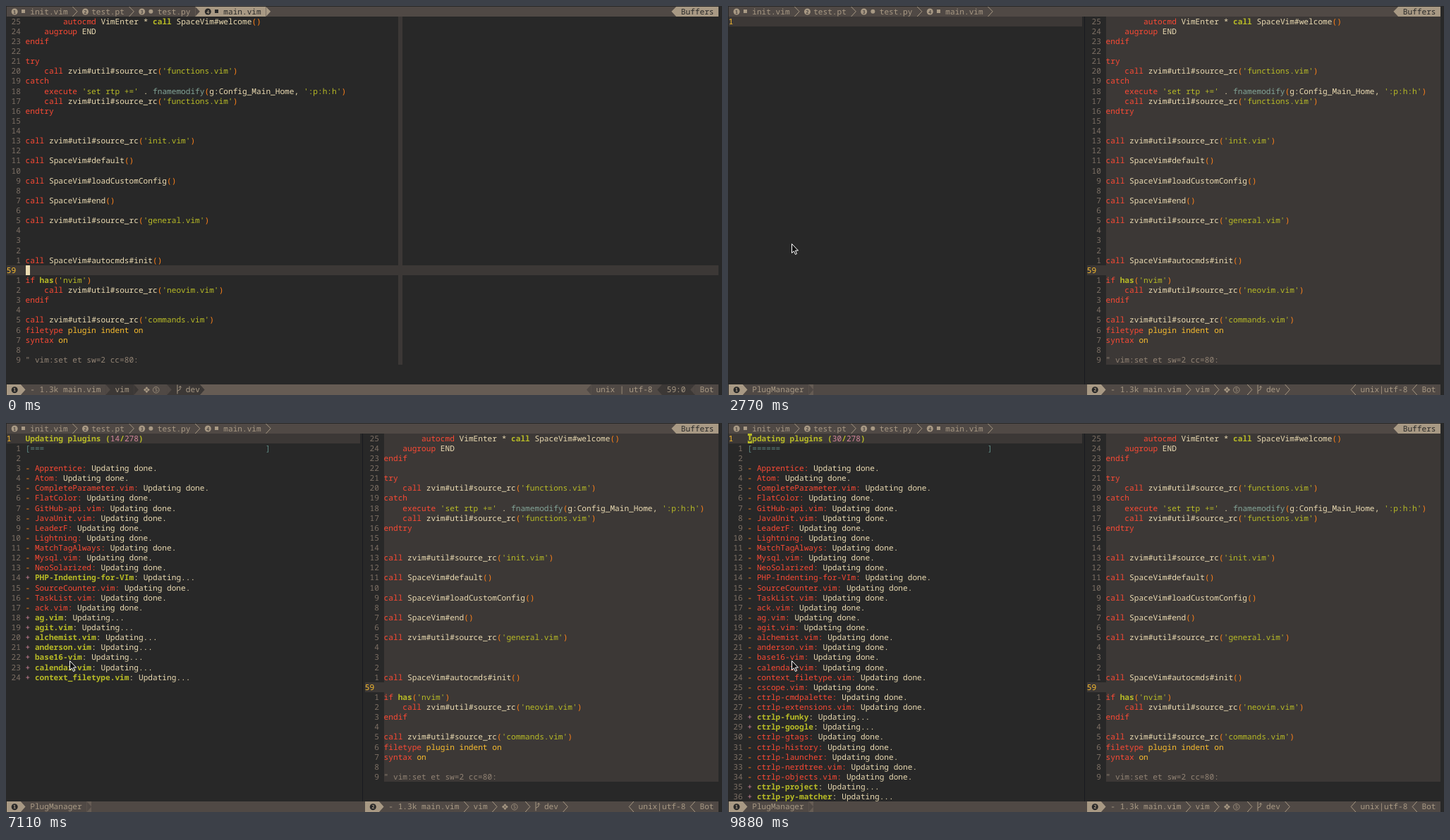
An HTML page with a canvas that plays this animation: 1015x552 px, repeating every 9.98 s.

```html
<!DOCTYPE html>
<html lang="en">
<head>
<meta charset="utf-8">
<title>Plugin update in a terminal editor</title>
<style>
  html, body { margin: 0; width: 100%; height: 100%; overflow: hidden; background: #282828; }
  canvas { display: block; }
</style>
</head>
<body>
<canvas id="stage" width="1015" height="552"></canvas>
<script>
const LOOP = 9980;
const CELL = 6.685, LINE = 14.125, LEFT = 0.8, TOP = 0.7, BASELINE = 10.9;
const COLS = 151, STATUS_ROW = 38;
const C = {
  bg: '#282828', bg1: '#3c3836', bg2: '#504945', bg3: '#665c54', number: '#7c6f64',
  light: '#a89984', fg: '#ebdbb2', red: '#fb4934', green: '#b8bb26', yellow: '#fabd2f',
  blue: '#83a598', teal: '#5f8a84', purple: '#d3869b', orange: '#fe8019',
  gray: '#928374', split: '#181a1f'
};
const FONT = '"Noto Sans Mono", "DejaVu Sans Mono", monospace';

const SOURCE = `        autocmd VimEnter * call SpaceVim#welcome()
    augroup END
endif

try
    call zvim#util#source_rc('functions.vim')
catch
    execute 'set rtp +=' . fnamemodify(g:Config_Main_Home, ':p:h:h')
    call zvim#util#source_rc('functions.vim')
endtry


call zvim#util#source_rc('init.vim')

call SpaceVim#default()

call SpaceVim#loadCustomConfig()

call SpaceVim#end()

call zvim#util#source_rc('general.vim')



call SpaceVim#autocmds#init()

if has('nvim')
    call zvim#util#source_rc('neovim.vim')
endif

call zvim#util#source_rc('commands.vim')
filetype plugin indent on
syntax on

" vim:set et sw=2 cc=80:`.split('\n');
const SYNTAX = new RegExp([
  '(?<gray>^".*)',
  "(?<green>'[^']*')",
  '(?<bold>(?<=\\* )call|\\bhas\\b)',
  '(?<red>\\b(?:autocmd|augroup|endif|try|catch|execute|endtry|call|if|filetype|syntax)\\b)',
  '(?<blue>fnamemodify)',
  '(?<yellow>plugin indent on|\\bon\\b)',
  '(?<orange>[()])',
  '(?<fg>\\w+|\\S)'
].join('|'), 'g');

const PLUGINS = ('Apprentice Atom CompleteParameter.vim FlatColor GitHub-api.vim JavaUnit.vim ' +
  'LeaderF Lightning MatchTagAlways Mysql.vim NeoSolarized PHP-Indenting-for-VIm ' +
  'SourceCounter.vim TaskList.vim ack.vim ag.vim agit.vim alchemist.vim anderson.vim ' +
  'base16-vim calendar.vim context_filetype.vim cscope.vim ctrlp-cmdpalette ' +
  'ctrlp-extensions.vim ctrlp-funky ctrlp-google ctrlp-gtags ctrlp-history ctrlp-launcher ' +
  'ctrlp-nerdtree.vim ctrlp-objects.vim ctrlp-project ctrlp-py-matcher').split(' ');
const range = (from, to) => Array.from({ length: to - from + 1 }, (_, i) => from + i);
const FINISH_ORDER = [1, 2, 3, 0, ...range(4, 10), ...range(12, 23), 11, 24, ...range(27, 31)];
const FINISH_TIMES = [
  4050, 4050, 4230, 4500, 4820, 5150, 5320, 5500, 5810, 5970, 6300, 6450, 6600, 7110, 7400,
  7740, 7850, 8030, 8150, 8300, 8400, 8790, 8880, 8930, 9050, 9200, 9300, 9390, 9670, 9880
];
const WORKERS = 8, TOTAL = 278;

const KEY_TIMES = [500, 700, 830, 1530, 1640, 1750, 1870, 1930, 1980];
const POINTER_SHOWN = 960, ENTER = 2550, SPLIT = 2770, FOCUS = 2820, LIST = 3850;

const g = document.getElementById('stage').getContext('2d');
g.textRendering = 'geometricPrecision';
const X = col => LEFT + col * CELL;
const Y = row => TOP + row * LINE;

function box(col, row, cols, rows, color) {
  const x = Math.round(X(col)), y = Math.round(Y(row));
  g.fillStyle = color;
  g.fillRect(x, y, Math.round(X(col + cols)) - x, Math.round(Y(row + rows)) - y);
}

function put(col, row, text, color, bold) {
  g.font = `${bold ? 'bold ' : ''}${CELL / 0.6}px ${FONT}`;
  g.fillStyle = color;
  g.fillText(text, X(col), Y(row) + BASELINE);
  return col + text.length;
}

function trace(points, closed) {
  g.beginPath();
  points.forEach(([x, y]) => g.lineTo(x, y));
  if (closed) g.closePath();
}

// Powerline separators: dir is 1 for right-pointing, -1 for left-pointing.
function separator(col, row, dir) {
  const back = X(dir > 0 ? col : col + 1), tip = X(dir > 0 ? col + 1 : col);
  trace([[back, Math.round(Y(row))], [tip, Y(row + 0.5)], [back, Math.round(Y(row + 1))]]);
}
function arrow(col, row, dir, color, behind) {
  box(col, row, 1, 1, behind);
  separator(col, row, dir);
  g.fillStyle = color;
  g.fill();
}
function chevron(col, row, dir = 1) {
  separator(col, row, dir);
  g.strokeStyle = C.light;
  g.lineWidth = 1;
  g.stroke();
}

function disc(x, y, radius, color) {
  g.beginPath();
  g.arc(x, y, radius, 0, 7);
  g.fillStyle = color;
  g.fill();
}

// A symbol centred in a glyph that is wider than one cell.
function symbol(col, row, text, font, color, drop) {
  g.font = font;
  g.textAlign = 'center';
  g.fillStyle = color;
  g.fillText(text, X(col) + 4.7, Y(row) + 7.3 + drop);
  g.textAlign = 'left';
}

function badge(col, row, label, color, ink) {
  const x = X(col) + 4.7, y = Y(row) + 7.3;
  if (ink) {
    disc(x, y, 4.5, color);
  } else {
    g.beginPath();
    g.arc(x, y, 4.3, 0, 7);
    g.strokeStyle = color;
    g.lineWidth = 0.8;
    g.stroke();
  }
  symbol(col, row, label, `${ink ? 'bold ' : ''}7px ${FONT}`, ink || color, 2.6);
}

function branch(col) {
  const x = X(col), y = Y(STATUS_ROW);
  g.strokeStyle = C.light;
  g.lineWidth = 1;
  trace([[x + 1.5, y], [x + 1.5, y + 13]]);
  g.stroke();
  trace([[x + 1.5, y + 9], [x + 5.5, y + 6.5], [x + 5.5, y + 2]]);
  g.stroke();
  trace([[x + 3.7, y + 4], [x + 5.5, y + 2], [x + 7.3, y + 4]]);
  g.stroke();
}

function fileIcon(col, round, color) {
  const x = X(col) + 4, y = Y(0) + 7;
  if (round) return disc(x, y, 3, color);
  g.fillStyle = color;
  g.fillRect(Math.round(x) - 3, Math.round(y) - 3, 5, 5);
}

function tabline(fileActive) {
  const active = fileActive ? C.bg : C.light, activeBg = fileActive ? C.light : C.bg2;
  box(0, 0, COLS, 1, C.bg2);
  if (fileActive) {
    box(41, 0, 14, 1, C.light);
    arrow(40, 0, 1, C.bg2, C.light);
    arrow(55, 0, 1, C.light, C.bg2);
  } else {
    chevron(40, 0);
    chevron(55, 0);
  }
  chevron(14, 0);
  chevron(26, 0);
  badge(1, 0, '1', C.light, C.bg2);
  fileIcon(3, false, C.light);
  put(5, 0, 'init.vim', C.light);
  badge(16, 0, '2', C.light, C.bg2);
  put(18, 0, 'test.pt', C.light);
  badge(28, 0, '3', C.light, C.bg2);
  fileIcon(30, true, C.light);
  put(32, 0, 'test.py', C.light);
  badge(42, 0, '4', active, activeBg);
  fileIcon(44, false, active);
  put(46, 0, 'main.vim', active);
  box(142, 0, 9, 1, C.light);
  arrow(141, 0, -1, C.light, C.bg2);
  put(143, 0, 'Buffers', C.bg);
}

function windowBadge(col, label) {
  box(col, STATUS_ROW, 3, 1, C.light);
  arrow(col + 3, STATUS_ROW, 1, C.light, C.bg2);
  badge(col + 1, STATUS_ROW, label, C.bg, C.light);
}

function fileInfo(col) {
  put(col + 5, STATUS_ROW, '- 1.3k main.vim', C.light);
  put(col + 23, STATUS_ROW, 'vim', C.light);
  symbol(col + 29, STATUS_ROW, '❖', '12px "DejaVu Sans", sans-serif', C.light, 4.3);
  badge(col + 31, STATUS_ROW, 'S', C.light);
  branch(col + 36);
  put(col + 38, STATUS_ROW, 'dev', C.light);
  put(147, STATUS_ROW, 'Bot', C.light);
}

function activeStatus() {
  const r = STATUS_ROW;
  box(0, r, COLS, 1, C.bg3);
  box(4, r, 17, 1, C.bg2);
  box(22, r, 5, 1, C.bg1);
  box(28, r, 6, 1, C.bg2);
  box(35, r, 6, 1, C.bg1);
  arrow(21, r, 1, C.bg2, C.bg1);
  arrow(27, r, 1, C.bg1, C.bg2);
  arrow(34, r, 1, C.bg2, C.bg1);
  arrow(41, r, 1, C.bg1, C.bg3);
  box(124, r, 14, 1, C.bg2);
  box(139, r, 6, 1, C.bg1);
  box(146, r, 5, 1, C.bg2);
  arrow(123, r, -1, C.bg2, C.bg3);
  arrow(138, r, -1, C.bg1, C.bg2);
  arrow(145, r, -1, C.bg2, C.bg1);
  windowBadge(0, '1');
  fileInfo(0);
  put(125, r, 'unix | utf-8', C.light);
  put(140, r, '59:0', C.light);
}

function splitStatus() {
  const r = STATUS_ROW;
  box(0, r, COLS, 1, C.bg2);
  arrow(17, r, 1, C.bg2, C.bg3);
  windowBadge(0, '1');
  put(5, r, 'PlugManager', C.light);
  windowBadge(76, '2');
  fileInfo(76);
  [97, 103, 110, 118].forEach(col => chevron(col, r));
  [132, 145].forEach(col => chevron(col, r, -1));
  put(134, r, 'unix|utf-8', C.light);
}

function lineNumber(col, row, n) {
  put(col, row, String(n).padStart(3), C.number);
}

function sourcePane(col, focused) {
  if (focused) {
    box(83, 1, 1, 35, C.bg1);
    box(0, 26, COLS, 1, C.bg1);
  } else {
    box(col + 4, 1, COLS - col - 4, 35, C.bg1);
    box(col, 26, 4, 1, C.bg1);
  }
  SOURCE.forEach((line, i) => {
    const row = i + 1, distance = Math.abs(row - 26);
    if (distance) lineNumber(col, row, distance);
    else put(col, row, '59', C.yellow);
    for (const match of line.matchAll(SYNTAX)) {
      const [kind] = Object.entries(match.groups).find(([, text]) => text);
      const bold = kind === 'bold';
      put(col + 4 + match.index, row, match[0], bold ? C.green : C[kind], bold);
    }
  });
}

function pluginList(t) {
  const done = FINISH_TIMES.filter(time => time <= t).length;
  let col = put(4, 1, 'Updating plugins (', C.green, true);
  col = put(col, 1, String(done), C.purple);
  col = put(col, 1, '/', C.green, true);
  col = put(col, 1, String(TOTAL), C.purple);
  put(col, 1, ')', C.green, true);

  lineNumber(0, 2, 1);
  lineNumber(0, 3, 2);
  const bar = '='.repeat(Math.ceil(done / TOTAL * 50));
  put(4, 2, `[${bar.padEnd(50)}]`, C.teal);

  const finished = new Set(FINISH_ORDER.slice(0, done));
  PLUGINS.slice(0, done + WORKERS).forEach((name, i) => {
    const row = i + 4, ready = finished.has(i);
    lineNumber(0, row, i + 3);
    put(4, row, ready ? '-' : '+', ready ? C.orange : C.purple);
    const end = put(6, row, name, ready ? C.red : C.green, !ready);
    put(end, row, ':', ready ? C.red : C.fg);
    put(end + 2, row, ready ? 'Updating done.' : 'Updating...', C.fg);
  });
}

function managerPane(t) {
  box(0, 1, 75, 1, C.bg1);
  put(0, 1, '1', C.yellow);
  g.fillStyle = C.split;
  g.fillRect(505, 15, 1, 522);
  const listed = t >= LIST;
  if (listed) pluginList(t);
  const blinkOn = (t - LIST + 1170) % 1170 < 570;
  if (t >= FOCUS && blinkOn) {
    box(4, 1, 1, 1, listed ? C.green : C.fg);
    if (listed) put(4, 1, 'U', C.bg1, true);
  }
}

function pointer(t) {
  if (t < POINTER_SHOWN) return;
  g.strokeStyle = '#fff';
  g.lineWidth = 1;
  if (t < ENTER) {
    g.fillStyle = '#fff';
    g.fillRect(87, 332, 6, 1);
    g.fillRect(89, 333, 1, 14);
    g.fillRect(87, 347, 6, 1);
    return;
  }
  trace([[90.5, 337.5], [90.5, 350.5], [93.4, 347.8], [95.5, 352.5],
         [97.5, 351.6], [95.5, 347], [99.5, 347]], true);
  g.fillStyle = '#111';
  g.fill();
  g.stroke();
}

function draw(t) {
  g.fillStyle = C.bg;
  g.fillRect(0, 0, 1015, 552);
  const split = t >= SPLIT;
  tabline(!split);
  if (split) {
    sourcePane(76, false);
    managerPane(t);
    splitStatus();
  } else {
    sourcePane(0, true);
    activeStatus();
    const typed = KEY_TIMES.filter(time => time <= t).length;
    if (!typed) {
      box(4, 26, 1, 1, C.fg);
    } else if (t < ENTER) {
      // Only the top edge of the command-line caret is inside the stage.
      g.fillStyle = C.fg;
      g.fillRect(Math.round(X(typed)), 551, 7, 1);
    }
  }
  pointer(t);
}

const start = performance.now();
function tick() {
  draw((performance.now() - start) % LOOP);
  requestAnimationFrame(tick);
}
tick();
</script>
</body>
</html>
```
